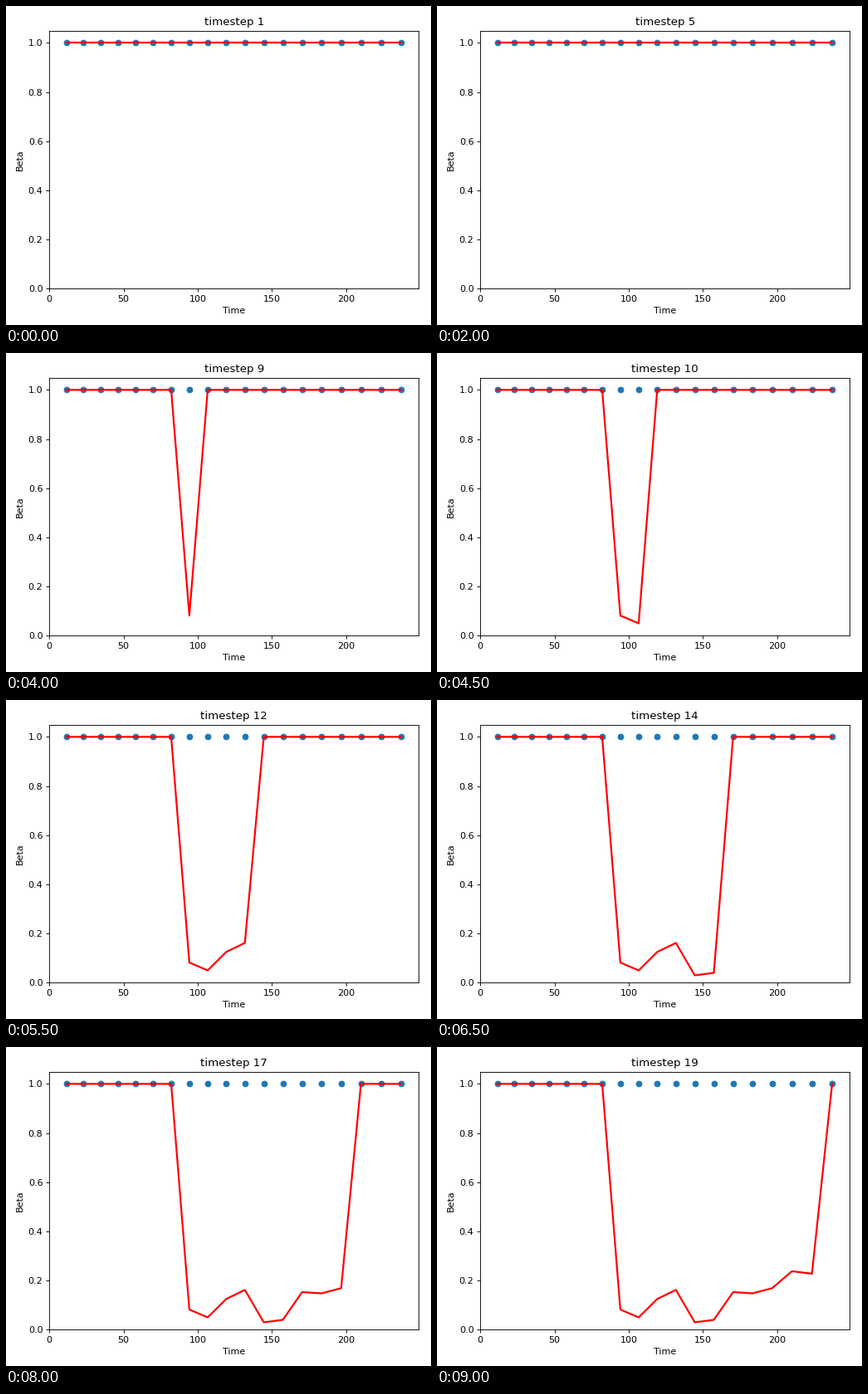
A matplotlib script for the animation above (9.5 s loop, 512 by 384 pixels).

```python
import numpy as np
import matplotlib.pyplot as plt
from matplotlib.animation import FuncAnimation

W, H, DPI = 512, 384, 80
LEFT, RIGHT, TOP, BOTTOM = 52.2, 497.2, 29.6, 340.0
STEPS, STEP_MS = 19, 500
FIRST_DROP = 7

k = np.arange(1, STEPS + 1)
times = 11.299 * k + 0.0621 * k**2
fitted = np.array([0.081, 0.049, 0.124, 0.161, 0.029, 0.039,
                   0.152, 0.147, 0.168, 0.237, 0.227])


def beta_at(step):
    """Beta is 1 until a time point has been fitted."""
    beta = np.ones(STEPS)
    done = max(0, step - 1 - FIRST_DROP)
    beta[FIRST_DROP:FIRST_DROP + done] = fitted[:done]
    return beta


fig = plt.figure(figsize=(W / DPI, H / DPI), dpi=DPI, facecolor="white")
ax = fig.add_axes([LEFT / W, 1 - BOTTOM / H,
                   (RIGHT - LEFT) / W, (BOTTOM - TOP) / H])
ax.scatter(times, np.ones(STEPS), color="tab:blue")
line, = ax.plot(times, beta_at(1), color="red", linewidth=2)
ax.set_xlim(0, times[-1] * 1.05)
ax.set_ylim(0, 1.05)
ax.set_xlabel("Time")
ax.set_ylabel("Beta")
title = ax.set_title("timestep 1")


def draw(i):
    line.set_ydata(beta_at(i + 1))
    title.set_text(f"timestep {i + 1}")
    return line, title


anim = FuncAnimation(fig, draw, frames=STEPS, interval=STEP_MS,
                     repeat=True, repeat_delay=0, blit=False)
plt.show()
```
